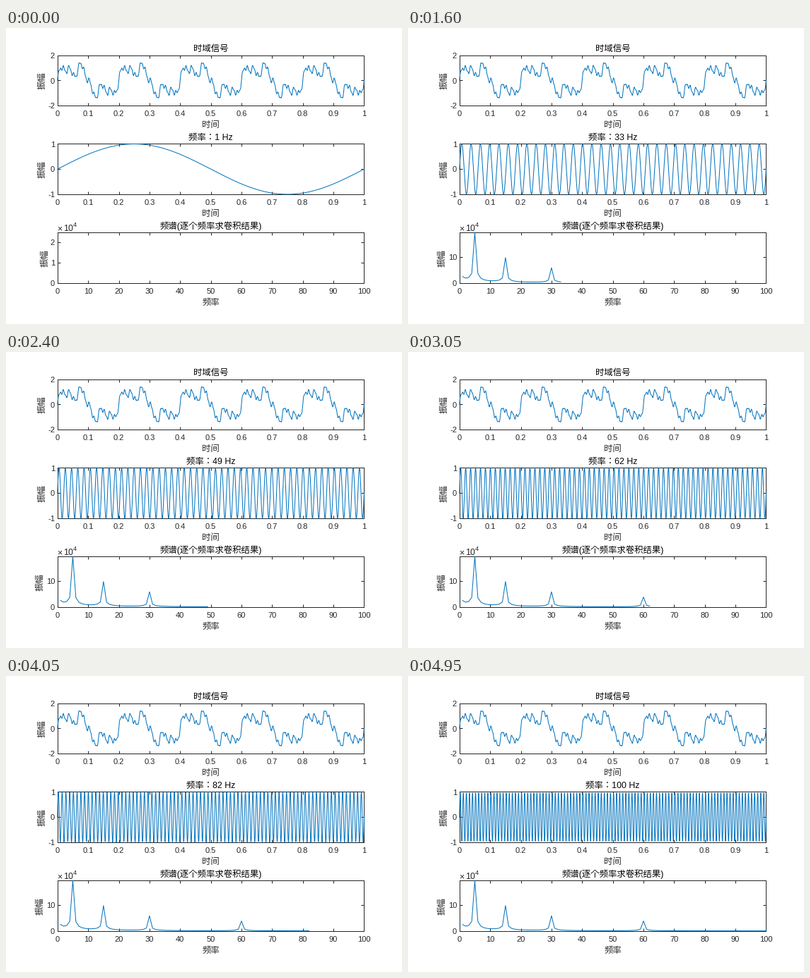
These frames come from a looping animation (560x420 px, 5 s). A matplotlib script:

```python
import numpy as np
import matplotlib.pyplot as plt
from matplotlib.animation import FuncAnimation

W, H, DPI = 560, 420, 100
PT = 72 / DPI                       # points per pixel
LEFT, RIGHT = 72.8, 506.45          # panel edges in pixels
TOP, PITCH, HEIGHT = 38.6, 125.9, 71.45
MID = (LEFT + RIGHT) / 2
TICK, LABEL = 11.1, 12.4            # text sizes in pixels
INK, BLUE = "#262626", "#0072BD"
FREQS = 100

plt.rcParams["font.family"] = ["Liberation Sans", "Noto Sans CJK JP"]
fig = plt.figure(figsize=(W / DPI, H / DPI), dpi=DPI, facecolor="white")


def text(x, y, s, size, ha="center", color=INK, **kw):
    """Text with its baseline at pixel (x, y), counted from the top left."""
    return fig.text(x / W, 1 - y / H, s, fontsize=size * PT, ha=ha,
                    va="baseline", color=color, **kw)


def panel(row, title, xlabel, xmax):
    top = TOP + row * PITCH
    bottom = top + HEIGHT
    ax = fig.add_axes([LEFT / W, 1 - bottom / H,
                       (RIGHT - LEFT) / W, HEIGHT / H])
    ax.set(xlim=(0, xmax), xticks=np.linspace(0, xmax, 11))
    ax.tick_params(direction="in", length=4.3 * PT, width=PT, color=INK,
                   top=True, right=True, labelbottom=False, labelleft=False)
    for spine in ax.spines.values():
        spine.set(linewidth=PT, edgecolor=INK)
    for k in range(11):
        text(LEFT + (RIGHT - LEFT) * k / 10, bottom + 15,
             f"{xmax * k / 10:g}", TICK)
    heading = text(MID, top - 5.7, title, LABEL, color="black")
    text(MID, bottom + 31, xlabel, LABEL)
    ylabel = text(54.5, top + HEIGHT / 2, "振幅", LABEL, rotation=90,
                  rotation_mode="anchor")
    line, = ax.plot([], [], color=BLUE, lw=PT, clip_on=False, zorder=3,
                    solid_joinstyle="round")
    marks = [text(69, 0, "", TICK, ha="right") for _ in range(3)]
    return ax, line, heading, ylabel, marks


def scale_y(row, ax, marks, lo, hi, step):
    """Set the y range and its tick labels."""
    ticks = np.arange(lo, hi + 1e-9, step)
    ax.set(ylim=(lo, hi), yticks=ticks)
    for mark in marks:
        mark.set_text("")
    for mark, v in zip(marks, ticks):
        y = TOP + row * PITCH + HEIGHT * (hi - v) / (hi - lo)
        mark.set_text(f"{v:g}")
        mark.set_y(1 - (y + 4.2) / H)


t = np.linspace(0, 1, 1001)
freqs = np.arange(1, FREQS + 1)
parts = {5: 1, 15: 0.5, 30: 0.3, 60: 0.2, 120: 0.1}   # frequency: amplitude
signal = sum(a * np.sin(2 * np.pi * f * t) for f, a in parts.items())

# Each component gives a narrow peak with leakage; heights in units of 10^4
spectrum = 1.8 / freqs + sum(18.7 * a / (1 + 5 * np.abs(freqs - f) ** 1.3)
                             for f, a in parts.items())

ax1, line1, _, _, marks1 = panel(0, "时域信号", "时间", 1)
scale_y(0, ax1, marks1, -2, 2, 2)
line1.set_data(t, signal)

ax2, wave, wave_title, _, marks2 = panel(1, "", "时间", 1)
scale_y(1, ax2, marks2, -1, 1, 1)

ax3, curve, _, ylabel3, marks3 = panel(2, "频谱(逐个频率求卷积结果)", "频率", 100)
text(72.5, 288, "×", LABEL, ha="left")
text(81, 288, "10", LABEL, ha="left")
text(94.5, 282.5, "4", 9.5, ha="left")


def draw(i):
    f = i + 1
    wave.set_data(t, np.sin(2 * np.pi * f * t))
    wave_title.set_text(f"频率：{f} Hz")
    curve.set_data(freqs[:f], spectrum[:f])

    peak = spectrum[:f].max()
    step = 1 if peak < 3 else 2 if peak < 5 else 10
    scale_y(2, ax3, marks3, 0, peak, step)
    ylabel3.set_x((51.5 if step == 10 else 58.5) / W)
    return wave, wave_title, curve, ylabel3, *marks3


anim = FuncAnimation(fig, draw, frames=FREQS, interval=50, repeat=True,
                     repeat_delay=0, blit=False)
plt.show()
```
